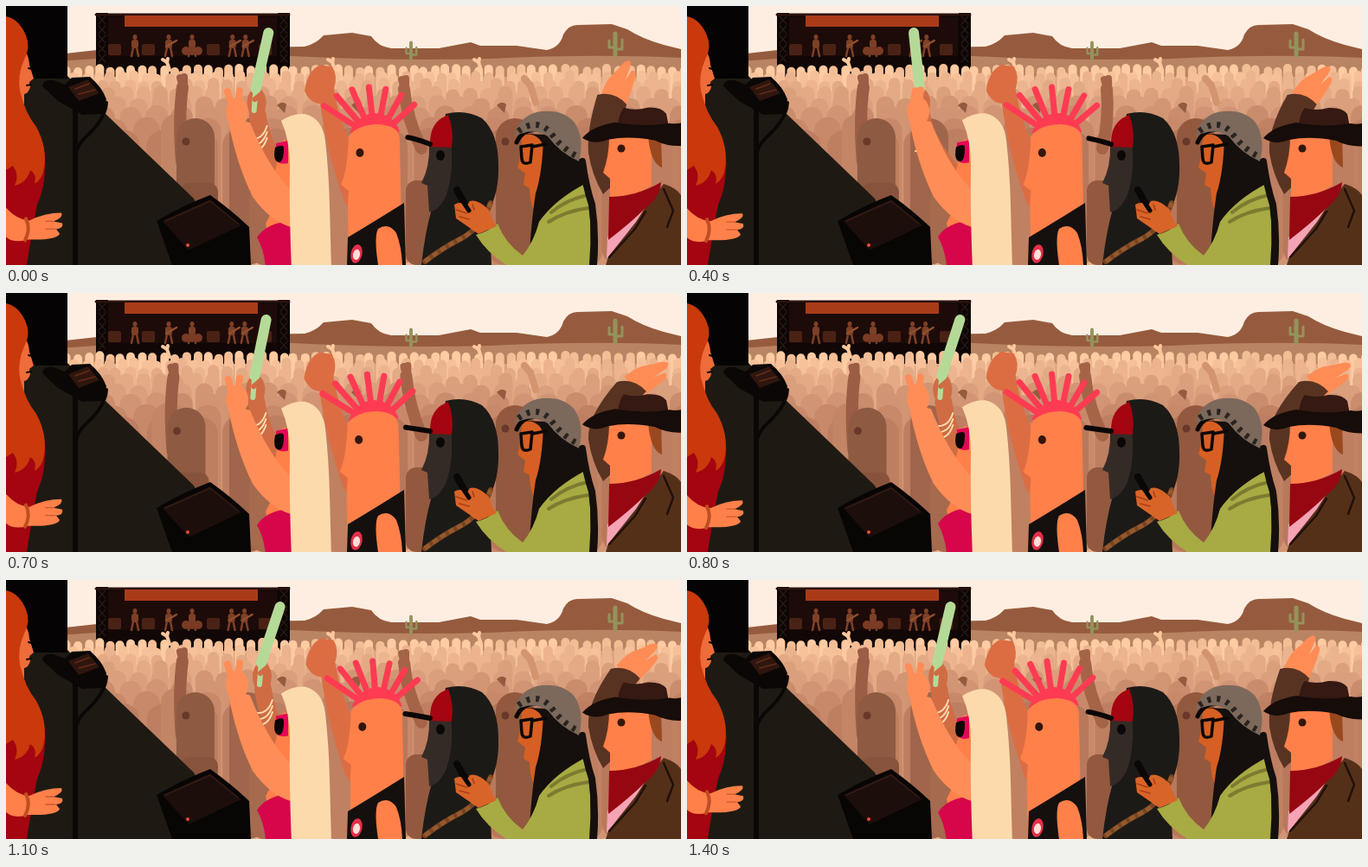
An HTML page with a canvas for the animation above (1.5 s loop, 780 by 300 pixels).

```html
<!DOCTYPE html>
<html lang="en">
<head>
<meta charset="utf-8">
<title>Desert concert</title>
<style>
html, body { margin: 0; width: 100%; height: 100%; overflow: hidden; background: #feeee2; }
canvas { display: block; }
</style>
</head>
<body>
<canvas id="stage" width="780" height="300"></canvas>
<script>
const ctx = document.getElementById('stage').getContext('2d');
const STEPS = 15, STEP_MS = 100;
const SKIN = '#ff8049', INK = '#0b0706', RED = '#a40510';
let step = 0;

const fill = (color, d) => { ctx.fillStyle = color; ctx.fill(new Path2D(d)); };
function line(color, width, d, cap = 'round') {
  ctx.strokeStyle = color;
  ctx.lineWidth = width;
  ctx.lineCap = cap;
  ctx.lineJoin = 'round';
  ctx.stroke(new Path2D(d));
}
function dashes(color, width, dash, d) {
  ctx.setLineDash(dash);
  line(color, width, d, 'butt');
  ctx.setLineDash([]);
}
function oval(color, x, y, rx, ry = rx, turn = 0) {
  ctx.fillStyle = color;
  ctx.beginPath();
  ctx.ellipse(x, y, rx, ry, turn, 0, 7);
  ctx.fill();
}
function box(color, x, y, w, h, r = 0) {
  ctx.fillStyle = color;
  ctx.beginPath();
  ctx.roundRect(x, y, w, h, r);
  ctx.fill();
}
function moved(x, y, draw, turn = 0) {
  ctx.save();
  ctx.translate(x, y);
  ctx.rotate(turn);
  draw();
  ctx.restore();
}
const noise = n => { const v = Math.sin(n * 127.1 + 3.7) * 43758.5453; return v - Math.floor(v); };
const mix = (a, b, u) => a + (b - a) * u;
const ease = u => (1 - Math.cos(Math.PI * u)) / 2;

// Motion: one wave per loop, two beats per loop, and a brief push around a peak.
const wave = peak => Math.cos((step - peak) / STEPS * 2 * Math.PI);
const beat = () => Math.cos((step - 6) / STEPS * 4 * Math.PI);
const push = peak => Math.max(0, wave(peak)) ** 2;
// The glow stick goes fully left, fully right, then drifts back.
function stickSway() {
  if (step < 4) return mix(.4, -1, ease(step / 4));
  if (step < 9) return mix(-1, 1, ease((step - 4) / 5));
  return mix(1, .4, ease((step - 9) / 6));
}

function cactus(x, y, scale) {
  moved(x, y, () => {
    ctx.scale(scale, scale);
    line('#94935c', 5, 'M0 0V-25');
    line('#94935c', 3, 'M0 -9H-7V-17M0 -7H8V-18');
  });
}

function landscape() {
  box('#feeee2', 0, 0, 780, 300);
  fill('#965b3e', 'M60 56L105 51L345 47Q358 44 367 34L400 31L422 35Q430 47 445 49H500L537 42L548 46H590L625 51Q640 48 644 33Q650 22 660 22L700 21L718 27Q735 38 760 45L780 50V80H60Z');
  fill('#b98463', 'M60 64Q200 54 330 58Q450 64 560 61Q680 55 780 60V90H60Z');
  cactus(468, 62, .78);
  cactus(704, 57, 1);
}

function player(x, guitar) {
  const c = '#7d4027';
  oval(c, x, 36, 2.5, 3);
  box(c, x - 4, 39, 8, 10, 3);
  line(c, 2.5, `M${x - 2} 48L${x - 4} 58M${x + 2} 48L${x + 4} 58`);
  if (guitar) line('#91502f', 2.5, `M${x - 3} 47L${x + 9} 40`);
}

function farStage() {
  box('#100706', 105, 9, 222, 76);
  box('#1d0b09', 118, 13, 195, 45);
  for (const x of [104, 314]) {
    box('#0c0605', x, 8, 14, 62);
    for (let y = 12; y < 62; y += 11)
      line('#2b1914', 1.2, `M${x + 3} ${y}L${x + 11} ${y + 9}M${x + 11} ${y}L${x + 3} ${y + 9}`);
  }
  line('#2a120d', 3, 'M104 10H327');
  box('#aa3b18', 137, 11, 154, 13);
  for (const x of [118, 157, 232, 292]) box('#4a2215', x, 44, 15, 13, 2);
  player(149, false);
  player(188, true);
  player(215, false);
  for (const x of [208, 215, 222]) oval('#7a3b25', x, 52, 5);
  const sway = -.8 + .8 * wave(2);
  player(262 + sway, true);
  player(277 + sway, true);
}

function crowd() {
  box('#d9a37d', 60, 82, 720, 218);
  for (let row = 0; row < 8; row++) {
    const y = 67 + row * 7 + row * row / 2, w = 10 + row ** 1.7, u = row / 7;
    const color = `rgb(${mix(255, 190, u)} ${mix(203, 126, u)} ${mix(162, 97, u)})`;
    for (let x = 64 - row * 5, seed = row * 83; x < 780; x += w * 1.15 + 1, seed++) {
      const px = x + noise(seed) * 3, py = y + noise(seed + 500) * 4;
      box(color, px, py, w, 300 - py, w / 2);
      if (noise(seed + 900) > .6) box('#7c402718', px, py, w, 300 - py, w / 2);
    }
  }
  for (const x of [185, 376, 545])
    line('#ffc79c', 4, `M${x + 4} 74L${x + 1} 65L${x - 4} 62M${x + 1} 66L${x + 2} 61`);
  line('#d3956f', 8, 'M612 112L606 92L599 84');
  for (const x of [319, 405, 573])
    fill('#935b40', `M${x - 6} 115Q${x} 109 ${x + 5} 114L${x + 3} 124L${x - 2} 119Z`);
}

function dancer(color, x, eye = '#69382a') {
  box(color, x, 130, 44, 170, 22);
  oval(eye, x + 11, 157, 4.5);
}
function raisedArm(color, d, x, y) {
  line(color, 14, `${d} ${x} ${y}`);
  line(color, 8, `M${x} ${y}L${x - 3} ${y - 11}M${x + 2} ${y}L${x + 2} ${y - 12}`);
}

function middleCrowd() {
  dancer('#9f664c', 258);
  box('#a66a4f', 281, 206, 50, 94, 18);
  box('#c08062', 371, 150, 40, 150, 18);
  box('#93593f', 462, 202, 42, 98, 12);
  dancer('#92593f', 566);
  moved(-11 * push(7.5), 3 * push(7.5), () => {
    box('#c28565', 179, 125, 38, 130, 18);
    raisedArm('#9b5d43', 'M203 180Q199 130', 204, 94);
    dancer('#8e5a42', 197);
    box('#88533c', 202, 205, 43, 80, 10);
  });
  const x = 460 + 25 * push(4);
  raisedArm('#a56447', `M480 165Q${x + 3} 130`, x, 96);
}

function foregroundStage() {
  fill('#1e1a13', 'M0 80H70L112 122L217 223L255 300H0Z');
  box('#050303', 0, 0, 71, 84);
  line(INK, 4, 'M116 112Q115 130 95 149Q82 160 80 174');
  line(INK, 6, 'M80 105V300');
  fill(INK, 'M42 93Q43 84 55 86L68 91L76 83L97 82Q111 94 116 108L112 125L88 126L60 110Z');
  fill('#2e160f', 'M72 94L95 85L108 101L84 110Z');
  line('#642c18', 1.5, 'M80 96L96 90M84 102L103 97');
  fill('#080505', 'M174 249Q204 231 236 219Q260 236 281 256L283 300H192Z');
  fill('#1c0e0b', 'M181 249L236 224L272 254L211 283Z');
  line('#351c14', 1.5, 'M184 249L236 226L268 252');
  oval('#f34b32', 210, 277, 2);
}

function singer() {
  fill('#ed6c39', 'M10 40Q26 50 27 68L32 84L27 88L28 94Q26 101 21 102V160H0V40Z');
  line(INK, 2, 'M26 72L29 73M24 92L29 91');
  fill(RED, 'M0 145L28 148Q48 164 45 190Q44 213 36 230Q31 255 24 300H0Z');
  fill('#c9390b', 'M0 12Q15 15 23 34Q29 48 21 62Q13 80 16 98Q22 124 35 140Q48 164 44 188Q42 201 33 206Q36 195 28 190Q24 205 10 208Q16 196 8 185L0 190Z');
  moved(0, 2 - 2 * beat(), () => {
    fill(SKIN, 'M0 232Q12 246 27 247Q45 238 64 238Q67 243 55 248L65 250Q67 256 58 257L62 262Q60 270 25 269Q9 274 0 266Z');
    line('#bf4e22', 4, 'M23 245Q29 257 22 270');
    line('#c85b30', 1.3, 'M46 248H55M46 257H57');
  });
}

function blonde() {
  const bob = 1.5 + 2 * beat(), sway = stickSway();
  const gripX = 283 + 14 * sway, gripY = 112;
  const handX = 267, handY = 121 + bob;
  const brown = '#cf6c44', arm = '#ff8d57';

  line(brown, 20, `M${gripX + 2} ${gripY + 14}Q${gripX + 7} 166 332 218`);
  oval(brown, gripX + 1, gripY, 11, 17);
  for (let k = 0; k < 18; k += 7)
    line('#ffdbad', 2, `M${gripX - 5} ${gripY + 42 + k}Q${gripX + 8} ${gripY + 43 + k} ${gripX + 13} ${gripY + 27 + k}`);
  line('#b5da98', 12, `M${291.5 + 29.5 * sway} 31L${gripX} ${gripY - 16}`);
  line('#b5da98', 6, `M${gripX} ${gripY - 16}L${gripX - 2} ${gripY + 9}`);
  line(brown, 6, `M${gripX + 5} ${gripY - 9}L${gripX - 1} ${gripY - 4}`);

  moved(0, bob, () => {
    fill(SKIN, 'M321 153L313 160Q316 179 308 196L312 205L313 225L300 250L310 300H350V160Z');
    fill('#d7064b', 'M290 266Q301 249 330 247V300H300Q298 280 290 266Z');
  });
  fill(arm, `M${handX - 11} ${handY + 6}Q${handX - 1} 183 285 221Q305 249 329 256V213Q303 187 ${handX + 15} ${handY + 12}Z`);
  oval(arm, handX, handY, 13, 17);
  const tipX = 256 + 8 * push(4), tipY = handY - 24;
  line(arm, 8, `M${handX - 6} ${handY - 8}L${tipX} ${tipY}M${handX + 1} ${handY - 10}L270 ${tipY - 1}`);

  moved(0, bob, () => {
    fill('#e30755', 'M312 157L326 154V180Q314 183 311 174Z');
    fill(INK, 'M311 162Q321 157 321 163Q321 179 315 179Q308 177 311 162Z');
    fill('#fddaac', 'M318 131Q331 122 345 123Q366 128 369 154Q373 190 374 230L376 305H330Q327 230 328 184Q328 153 318 131Z');
  });
}

function mohawk() {
  const dx = -1 - 3.5 * beat();
  moved(dx / 2, 1 + beat(), () => {
    fill('#dc6d43', 'M346 97Q349 74 364 67L378 69Q385 80 380 95L384 115Q390 140 402 165V240L392 225Q372 170 364 112Q352 111 346 97Z');
  });
  moved(dx, 0, () => {
    moved(427, 143, () => {
      for (let i = -3; i <= 3; i++) {
        const a = i * .32, r = 49;
        line('#ff3b52', 7, `M${i * 5} 0L${i * 4 - 5 + r * Math.sin(a)} ${-r * Math.cos(a)}`);
      }
      fill('#ff3b52', 'M-28 4Q-18 -18 2 -19Q24 -17 30 3Z');
    }, -.04 * beat());
    fill(SKIN, 'M398 151Q409 137 432 137Q455 138 457 153L460 300H398L397 229L398 214L389 207Q397 190 398 151Z');
    oval('#34160e', 411, 170, 4.5, 5);
  });
  fill('#15100e', 'M395 268Q425 250 460 228L462 300H394Z');
  fill(SKIN, 'M430 300Q425 267 430 258Q442 250 451 263Q457 278 458 300Z');
  oval('#e52f4b', 405, 287, 6.5, 11, .2);
  oval('#ffdfd6', 405, 288, 4, 6, .2);
}

function hooded() {
  fill('#1c1a17', 'M508 125Q530 119 550 130Q569 147 569 184Q570 215 558 237L561 300H480Q484 263 492 235Z');
  fill('#352b26', 'M489 161L514 158Q518 194 508 221Q500 237 489 239L487 208L480 205Q490 186 489 161Z');
  oval(INK, 502, 173, 5, 6);
  fill(RED, 'M490 163Q489 139 503 130L511 126Q518 144 515 164Z');
  const brim = 154 - 2 * wave(1);
  line(INK, 6, `M${463 + 2 * wave(2)} ${brim}Q475 ${brim + 2} 490 160`);
  const strap = 'M484 296Q505 280 523 271Q549 258 560 228';
  line('#774420', 6, strap);
  dashes('#95592d', 5, [7, 4], strap);
}

function beanieGirl() {
  fill('#15100d', 'M600 148L655 150Q664 190 674 214Q683 249 681 300H605Q610 250 612 220Z');
  fill('#d75f23', 'M596 149Q619 145 622 169Q623 194 614 215Q614 232 609 235Q605 222 605 211L598 207L600 194L591 187Q596 171 596 149Z');
  fill('#15100d', 'M621 151L643 162Q630 184 626 217Q617 250 616 300H604Q607 249 612 217Q620 193 621 151Z');
  line(INK, 3.5, 'M595 163L608 161L606 181Q597 185 596 177ZM608 163L624 160');
  line(INK, 5, 'M590 158Q596 144 612 143');
  fill('#7c695c', 'M588 151Q592 129 613 123Q642 118 657 135Q669 154 662 180Q640 170 626 151Q608 140 588 151Z');
  dashes('#2b231e', 7, [4, 7], 'M592 145Q615 128 631 149Q644 166 660 174');
  fill('#a8aa43', 'M543 265Q558 261 568 252Q577 275 597 289Q610 273 616 250Q634 224 671 205Q678 252 674 300H578Q555 285 543 265Z');
  line('#7c7b30', 4, 'M630 239Q648 224 672 219M627 250Q645 238 673 234');
  line('#15100d', 8, 'M666 180Q670 209 677 230Q682 264 679 300');
  line(INK, 8, 'M521 213L538 243');
  fill('#d96428', 'M518 230Q526 225 532 232L536 226Q545 223 558 236Q562 250 567 255L546 264L533 255L520 246Z');
  line('#a93f17', 1.6, 'M520 236L532 240M524 244L535 247M539 230L541 236');
  line(INK, 5, 'M525 222L535 237');
}

function cowboy() {
  const w = wave(8);
  const wx = 714 + 12 * w, wy = 108, tx = 745 + 24 * w, ty = 75 + 9 * w;
  moved(wx, wy, () => {
    fill('#ff8c55', 'M-3 -15Q13 -17 20 -15L34 -10Q45 -8 48 -3Q48 2 38 2L25 3L39 5Q42 10 33 12L20 14L-3 16Z');
  }, Math.atan2(ty - wy, tx - wx));
  fill('#593322', `M673 170Q671 143 ${wx - 19} ${wy - 5}Q${wx} ${wy - 10} ${wx + 15} ${wy + 6}Q707 143 704 205L690 218Q677 196 673 170Z`);
  fill('#553019', 'M693 300L697 288L745 225L760 206Q775 211 780 219V300Z');
  fill('#f5a3b5', 'M695 268L742 228L728 250L694 293Z');
  fill(SKIN, 'M697 151L746 153V208L724 220L698 228V200L690 193Q697 174 697 151Z');
  fill('#9a491e', 'M742 151H757L758 187Q745 183 742 151Z');
  fill('#970712', 'M697 221Q728 221 757 204Q756 221 738 235Q722 251 696 271Z');
  line('#211009', 2.5, 'M739 238L727 258L697 291M760 212L771 237L764 256');
  oval('#34160e', 711, 165, 4.5);
  moved(0, -1 - beat(), () => {
    fill('#351912', 'M706 146Q708 125 714 119Q727 123 741 119Q757 118 763 126L768 152Q735 156 706 146Z');
    fill('#160c09', 'M666 154Q678 140 704 136Q738 142 767 137Q777 139 785 135V163Q766 165 750 157Q720 151 696 156Q679 163 666 154Z');
  });
}

function draw() {
  landscape();
  farStage();
  crowd();
  middleCrowd();
  foregroundStage();
  singer();
  hooded();
  mohawk();
  blonde();
  beanieGirl();
  cowboy();
}

let shown = -1;
function tick() {
  step = Math.floor(performance.now() / STEP_MS) % STEPS;
  if (step !== shown) {
    shown = step;
    draw();
  }
  requestAnimationFrame(tick);
}
tick();
</script>
</body>
</html>
```
